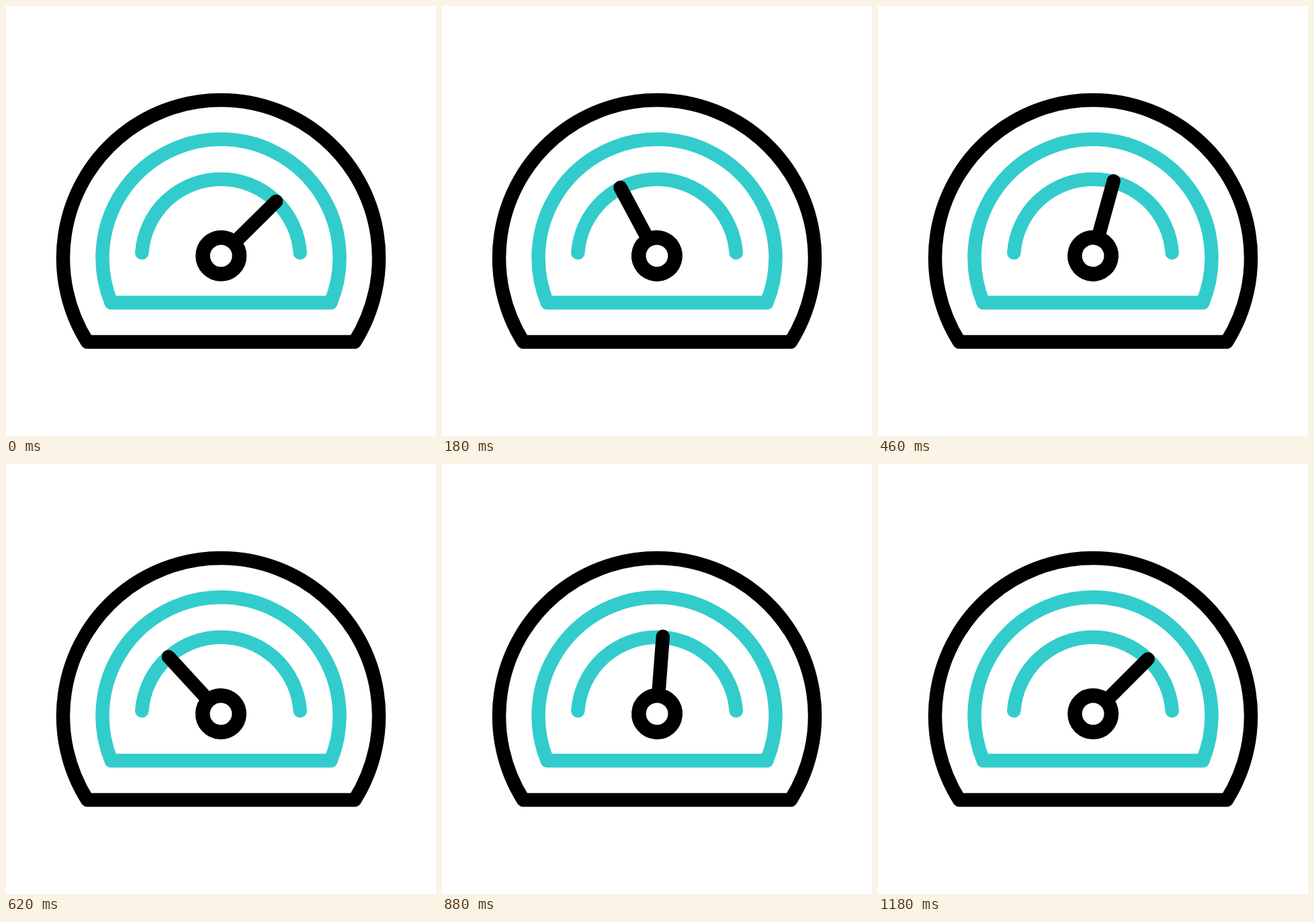
An HTML page for the animation above (1.2 s loop, 640 px wide and 640 px high).

```html
<!DOCTYPE html>
<html lang="en">
<head>
<meta charset="utf-8">
<title>Gauge</title>
<style>
  html, body { margin: 0; width: 100%; height: 100%; overflow: hidden; background: #fff; }
  svg { display: block; width: 100%; height: 100%; }
  path, circle { fill: none; stroke: #000; stroke-width: 20.5; stroke-linecap: round; stroke-linejoin: round; }
  .dial { stroke: #33cccc; }
  .hub { stroke-width: 21.6; fill: #fff; }
</style>
</head>
<body>
<svg viewBox="0 0 640 640">
  <path d="M121 500A235 235 0 1 1 519 500Z"/>
  <path class="dial" d="M156.6 441.6A176.5 176.5 0 1 1 483.4 441.6Z"/>
  <path class="dial" d="M202.3 367.3A118 118 0 0 1 437.7 367.3"/>
  <g id="needle">
    <path d="M0 -30V-115.5"/>
    <circle class="hub" cy="-.2" r="27.2"/>
  </g>
</svg>
<script>
  const LOOP = 1200, STEP = 20, REST = 45.3;
  const needle = document.getElementById('needle');

  // Turning points of the needle.
  const turns = [
    { at: 0, angle: REST },
    { at: 200, angle: -30.2 },
    { at: 400, angle: 43 },
    { at: 600, angle: -43.6 },
    { at: LOOP, angle: REST }
  ];

  const bezier = (u, a, b) => 3 * (1 - u) ** 2 * u * a + 3 * (1 - u) * u * u * b + u ** 3;

  // Quick start, soft landing: cubic-bezier(.15, 0, .68, 1).
  function ease(x) {
    let low = 0, high = 1;
    for (let i = 0; i < 24; i++) {
      const mid = (low + high) / 2;
      if (bezier(mid, 0.15, 0.68) < x) low = mid; else high = mid;
    }
    return bezier(low, 0, 1);
  }

  function angleAt(time) {
    const next = turns.findIndex(turn => time < turn.at);
    const from = turns[next - 1], to = turns[next];
    const progress = ease((time - from.at) / (to.at - from.at));
    return from.angle + (to.angle - from.angle) * progress;
  }

  function draw() {
    const time = Math.floor(performance.now() % LOOP / STEP) * STEP;
    needle.setAttribute('transform', `translate(320 372) rotate(${angleAt(time)})`);
    requestAnimationFrame(draw);
  }
  draw();
</script>
</body>
</html>
```
